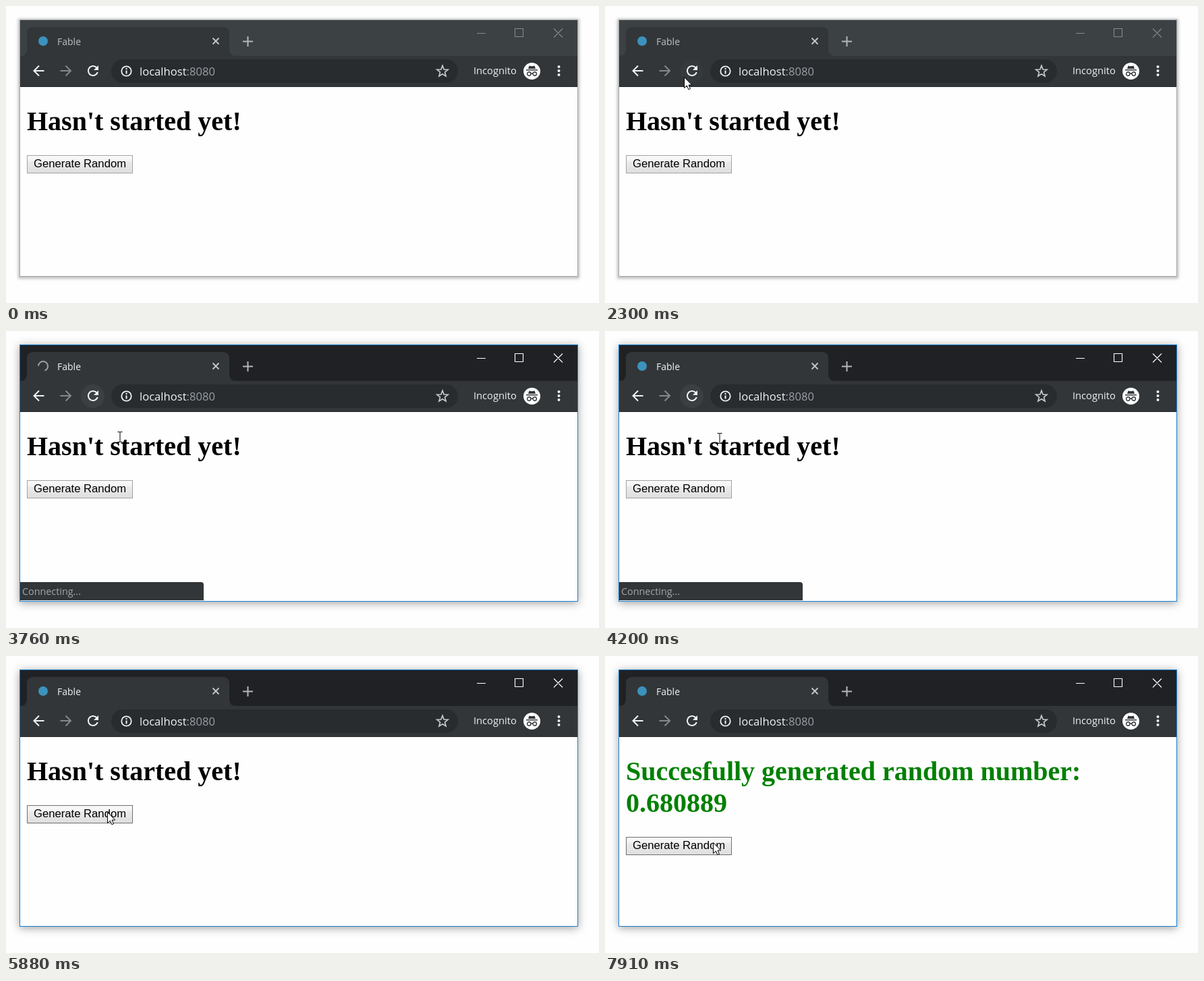
Animation, 879 px wide and 440 px high, one loop 8000 ms. Source, as an HTML page:

```html
<!DOCTYPE html>
<html lang="en">
<head>
<meta charset="utf-8">
<title>Random number demo</title>
<style>
  html, body { margin: 0; width: 100%; height: 100%; overflow: hidden; background: #fefefe; }
  #window { position: absolute; left: 20px; top: 20px; width: 828px; height: 381px;
    box-shadow: 0 1px 4px 2px rgba(0,0,0,.25); }
  #window.active { box-shadow: 0 2px 12px rgba(0,0,0,.38); }
  svg { position: absolute; left: 0; top: 0; display: block; }
  .line { fill: none; stroke: #f1f3f4; stroke-width: 2; }
  .ui { font-family: "Open Sans", "Noto Sans", sans-serif; fill: #f1f3f4; }
  .heading { font: bold 40px "Liberation Serif", "Times New Roman", serif; }
  .label { font: 16.667px "Liberation Sans", Arial, sans-serif; }
</style>
</head>
<body>
<div id="window"></div>
<svg width="879" height="440" viewBox="0 0 879 440">
  <defs>
    <linearGradient id="raised" x2="0" y2="1">
      <stop offset="0" stop-color="#fafafa"/><stop offset=".28" stop-color="#f4f4f4"/>
      <stop offset=".36" stop-color="#ebebeb"/><stop offset="1" stop-color="#dedede"/>
    </linearGradient>
  </defs>

  <rect x="20" y="20" width="828" height="381" fill="#fefefe"/>
  <rect id="titlebar" x="20" y="20" width="828" height="54"/>
  <rect x="20" y="74" width="828" height="46" fill="#323639"/>
  <rect x="20" y="119" width="828" height="1" fill="#25282a"/>

  <!-- tab strip -->
  <path fill="#323639" d="M21 74q10 0 10-10V41q0-10 10-10H321q10 0 10 10V64q0 10 10 10z"/>
  <circle id="favicon" cx="55" cy="52" r="7" fill="#3c92bd"/>
  <circle id="spinner" cx="55" cy="52" r="7" class="line" stroke-dasharray="30 14"/>
  <text id="tabTitle" class="ui" x="76" y="58" font-size="14">Fable</text>
  <path class="line" style="stroke:#c4c7c9;stroke-width:1.8" d="M306.500 47.500l9 9m0-9l-9 9"/>
  <path class="line" style="stroke:#b4b7b9" d="M351 52.500h15M358.500 45v15"/>
  <path id="controls" class="line" style="stroke-width:1.1"
    d="M698 40.500h13M754.500 33.500h12v12h-12zM812 33.500l13 13m0-13l-13 13"/>

  <!-- toolbar -->
  <path class="line" d="M56.500 96H41.500M49 88.500L41.500 96l7.500 7.500"/>
  <path class="line" style="stroke:#85888a" d="M80.500 96H96M88.500 88.500L96 96l-7.500 7.500"/>
  <circle id="reloadHover" cx="128.500" cy="96.500" r="17.500" fill="#4b4e51"/>
  <path fill="#f1f3f4" transform="translate(117 84)" d="M17.650 6.350C16.200 4.900 14.210 4 12 4c-4.420 0-7.990 3.580-7.990 8s3.570 8 7.990 8c3.730 0 6.840-2.550 7.730-6h-2.080c-.82 2.330-3.040 4-5.650 4-3.310 0-6-2.690-6-6s2.690-6 6-6c1.660 0 3.140.69 4.220 1.780L13 11h7V4z"/>
  <rect x="156" y="79" width="514" height="35" rx="17.500" fill="#282c2f"/>
  <circle class="line" style="stroke-width:1.8" cx="178.500" cy="96.500" r="7.200"/>
  <path class="line" d="M178.500 92v2M178.500 95.500v5"/>
  <text class="ui" x="198" y="103" font-size="16.600">localhost<tspan fill="#9aa0a6">:8080</tspan></text>
  <path id="star" class="line" style="stroke:#c8cbcd;stroke-width:1.7"/>
  <text class="ui" x="693" y="101" font-size="14.700">Incognito</text>
  <circle cx="779.500" cy="96.500" r="12.500" fill="#fff"/>
  <path fill="#323639" d="M775.500 88.500q4 1.500 8 0l1.500 4.500h-11zM771 94h17v1.500h-17z"/>
  <path class="line" style="stroke:#323639;stroke-width:1.4"
    d="M778 100.500a2.700 2.700 0 1 0-5.400 0a2.700 2.700 0 1 0 5.400 0q1.500-1 3 0a2.700 2.700 0 1 0 5.400 0a2.700 2.700 0 1 0-5.400 0"/>
  <g fill="#f1f3f4">
    <circle cx="819.500" cy="90" r="2"/><circle cx="819.500" cy="96" r="2"/><circle cx="819.500" cy="102" r="2"/>
  </g>

  <!-- page -->
  <g id="page">
    <text id="line1" class="heading" x="31" y="184"></text>
    <text id="line2" class="heading" x="31" y="231"></text>
    <g id="button">
      <rect id="face" x="31.500" y="221.500" width="156" height="26"/>
      <text id="label" class="label" x="41" y="239">Generate Random</text>
    </g>
  </g>

  <g id="status">
    <path fill="#323639" d="M20 372H289q4 0 4 4V399H20z"/>
    <text class="ui" x="24" y="391" font-size="14.350" style="fill:#a4a7aa">Connecting...</text>
  </g>
  <rect id="border" x="20.500" y="20.500" width="827" height="380" fill="none"/>

  <g id="cursor">
    <path id="arrow" fill="#fff" stroke="#000" d="M.5.5V16.500L4.300 13l2.600 5.700 2.600-1.100L7 12h4.700z"/>
    <path id="beam" fill="none" stroke="#000" d="M-3.500-7.500h3l.5.5.5-.5h3M0-7V7M-3.500 7.500h3L0 7l.5.5h3"/>
  </g>
</svg>
<script>
const LOOP = 8000;
const el = Object.fromEntries([...document.querySelectorAll('[id]')].map(e => [e.id, e]));

// Keyframes: [time, ...values]
const cursorPath = [
  [290, 707, 438], [1000, 409, 319], [1100, 409, 319], [1880, 148, 154],
  [1980, 148, 154], [2270, 117, 105], [2400, 117, 105], [2630, 131, 95],
  [3250, 131, 95], [3780, 170, 159], [4510, 170, 159], [4920, 168, 196],
  [5310, 161, 221], [5340, 161, 221], [6010, 147, 234],
  [6800, 147, 234], [7520, 160, 276]
];
const hoverLevels = [
  [2250, 0], [2300, .1], [2500, .4], [2630, .6], [2790, 1], [3300, 1], [3700, .4], [4510, .4], [4650, 0]
];

function sample(keys, t) {
  const i = keys.findIndex(k => k[0] > t);
  if (i < 0) return keys.at(-1).slice(1);
  if (i === 0) return keys[0].slice(1);
  const a = keys[i - 1], b = keys[i], p = (t - a[0]) / (b[0] - a[0]);
  return a.slice(1).map((v, j) => v + (b[j + 1] - v) * p);
}
const within = (v, from, to) => v >= from && v < to;
const show = (e, on) => e.setAttribute('visibility', on ? 'visible' : 'hidden');
const paint = (e, attrs) => { for (const k in attrs) e.setAttribute(k, attrs[k]); };

const starPoints = Array.from({ length: 10 }, (_, i) => {
  const a = i * Math.PI / 5 - Math.PI / 2, r = i % 2 ? 3.7 : 8.6;
  return `${647 + r * Math.cos(a)} ${97 + r * Math.sin(a)}`;
});
el.star.setAttribute('d', `M${starPoints.join('L')}z`);

function drawWindow(t) {
  const active = t >= 2790, reloading = within(t, 3050, 4150);
  el.window.className = active ? 'active' : '';
  paint(el.titlebar, { fill: active ? '#202124' : '#3c4143' });
  paint(el.border, { stroke: active ? '#1a80d2' : '#a5a7a8' });
  el.controls.style.stroke = active ? '#fff' : '#85898b';
  el.tabTitle.style.fill = active ? '#f1f3f4' : '#bdc0c3';
  paint(el.reloadHover, { opacity: sample(hoverLevels, t)[0] });
  show(el.favicon, !reloading);
  show(el.spinner, reloading);
  const fetching = t >= 3880;
  el.spinner.style.stroke = fetching ? '#8ab4f8' : '#9aa0a6';
  paint(el.spinner, { transform: `rotate(${(t - 3050) * (fetching ? .4 : -.25)} 55 52)` });
  show(el.status, within(t, 3350, 4620));
}

function drawPage(t, x, y) {
  const loading = within(t, 6500, 7870), done = t >= 7870;
  const blank = within(t, 3900, 4100), shift = done ? 47 : 0;
  el.page.style.display = blank ? 'none' : '';
  el.line1.textContent = done ? 'Succesfully generated random number:'
    : loading ? 'LOADING...' : "Hasn't started yet!";
  el.line2.textContent = done ? '0.680889' : '';
  paint(el.line1, { fill: done ? '#008000' : '#000' });
  paint(el.line2, { fill: '#008000' });
  paint(el.button, { transform: `translate(0 ${shift})` });
  const hovered = !loading && within(x, 31, 188) && within(y, 221 + shift, 248 + shift);
  paint(el.face, {
    fill: within(t, 6480, 6500) ? '#dedede' : 'url(#raised)',
    stroke: hovered ? '#6f6f6f' : '#a3a3a3'
  });
  paint(el.label, { fill: loading ? '#808080' : '#000' });
  return !blank && within(x, 31, 348) && within(y, 150, 194);
}

function draw() {
  const t = performance.now() % LOOP;
  const [x, y] = sample(cursorPath, t).map(Math.round);
  drawWindow(t);
  const overText = drawPage(t, x, y);
  paint(el.cursor, { transform: `translate(${x} ${y})` });
  show(el.arrow, t >= 290 && !overText);
  show(el.beam, t >= 290 && overText);
  requestAnimationFrame(draw);
}
draw();
</script>
</body>
</html>
```
